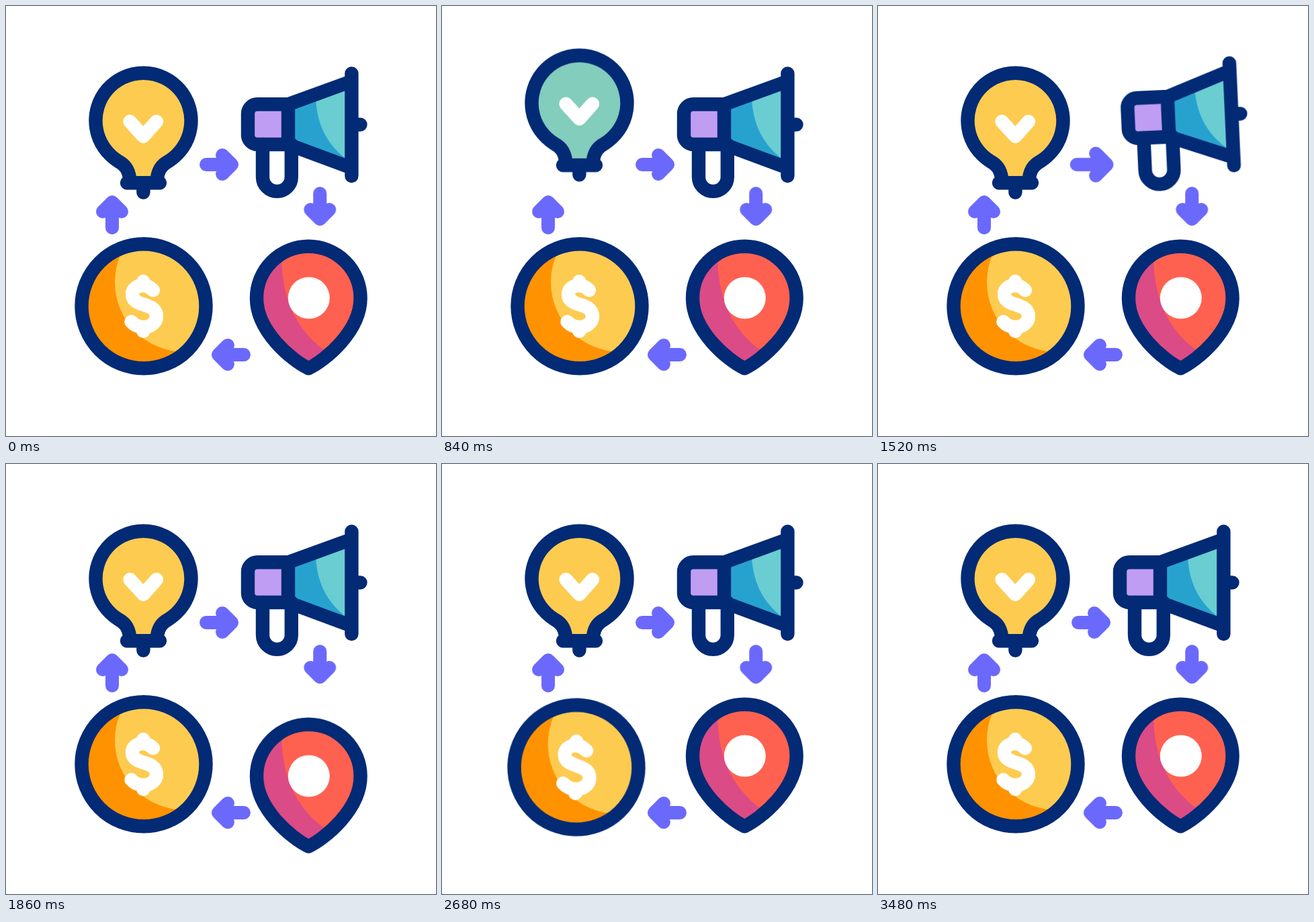
An HTML page that plays this animation: 640 px wide and 640 px high, repeating every 3.6 s.

```html
<!DOCTYPE html>
<html lang="en">
<head>
<meta charset="utf-8">
<title>Marketing cycle</title>
<style>
  html, body { margin: 0; width: 100%; height: 100%; overflow: hidden; background: #fff; }
  svg { display: block; width: 640px; height: 640px; }

  .line, .white, .arrow { stroke-width: 20.4; stroke-linecap: round; stroke-linejoin: round; fill: none; }
  .line { stroke: #032a75; }
  .white { stroke: #fff; }
  .arrow { stroke: #6b69fc; stroke-width: 20; }
  .arrow, .white { vector-effect: non-scaling-stroke; }

  .balloon, .skin, .horn, .pin, .coin, .dollar, .arrow {
    animation: 3600ms cubic-bezier(.33, 0, .67, 1) infinite;
  }
  .balloon { animation-name: rise; }
  .skin { animation-name: tint; fill: #fdcb50; }
  .horn { animation-name: shout; transform-origin: 443px 188px; }
  .pin { animation-name: drop; }
  .coin { animation-name: roll; transform-origin: 205px 446.8px; }
  .dollar { animation-name: grow; transform-origin: 204.5px 447px; }
  .arrow { animation-name: thrust; animation-delay: calc(var(--i) * 860ms - 3600ms); }

  @keyframes rise {
    0%, 2.22%, 30.8%, 100% { transform: translateY(0); }
    18.2% { transform: translateY(-41.5px); }
  }
  @keyframes tint {
    0%, 2.22%, 30%, 100% { fill: #fdcb50; }
    11%, 21% { fill: #69cdd2; }
  }
  @keyframes shout {
    0%, 23.9%, 46.4%, 100% { transform: translate(0, 0) rotate(0deg); }
    36.6% { transform: translate(32.5px, -32px) rotate(-6.7deg); }
  }
  @keyframes drop {
    0%, 45.55%, 70.3%, 100% { transform: translateY(0); }
    52.5%, 61.1% { transform: translateY(31px); }
  }
  @keyframes roll {
    0%, 72.2%, 96.4%, 100% { transform: translate(0, 0) rotate(0deg); }
    80.55%, 85.55% { transform: translate(-27.4px, 25px) rotate(6deg); }
  }
  @keyframes grow {
    0%, 72.2%, 96.4%, 100% { transform: scale(1); }
    80.55%, 85.55% { transform: scale(1.25); }
  }
  @keyframes thrust {
    0%, 4.44%, 20%, 100% { transform: translateY(0) scale(1); }
    6.67% { transform: translateY(-12px) scale(1.3); }
    8.33% { transform: translateY(-4px) scale(1.42); }
    11.1% { transform: translateY(4px) scale(1.37); }
    15% { transform: translateY(-15px) scale(1.31); }
    16.67% { transform: translateY(-2.5px) scale(1.37); }
  }
</style>
</head>
<body>
<svg viewBox="0 0 640 640" xmlns="http://www.w3.org/2000/svg">
  <defs>
    <path id="drop" d="M450.3 539.3C425 527 373 484 373 435A77.3 77.3 0 0 1 527.6 435C527.6 484 475.6 527 450.3 539.3Z"/>
    <clipPath id="inDrop"><use href="#drop"/></clipPath>
    <clipPath id="inCoin"><circle cx="205" cy="446.8" r="92"/></clipPath>
  </defs>

  <g transform="translate(158 311)"><path class="arrow" style="--i:0" d="M0 19V-19M-14-5L0-19L14-5"/></g>
  <g transform="translate(317 236) rotate(90)"><path class="arrow" style="--i:1" d="M0 19V-19M-14-5L0-19L14-5"/></g>
  <g transform="translate(467.3 298) rotate(180)"><path class="arrow" style="--i:2" d="M0 19V-19M-14-5L0-19L14-5"/></g>
  <g transform="translate(335 519) rotate(270)"><path class="arrow" style="--i:3" d="M0 19V-19M-14-5L0-19L14-5"/></g>

  <g class="balloon">
    <path class="skin" d="M184 260V254C182 242 176 236 167 231A71 71 0 1 1 242 231C233 236 227 242 225 254V260Z"/>
    <path class="line" d="M184 256C182 242 176 236 167 231A71 71 0 1 1 242 231C233 236 227 242 225 256M180 263.3H229M204.4 263.3V277.5"/>
    <path class="white" d="M184.5 172L204.4 194L224 172"/>
  </g>

  <g class="horn">
    <path fill="#bf9df3" d="M360 146H420V206H360Z"/>
    <path fill="#27a2cf" d="M420 146L514 112V241L420 206Z"/>
    <path fill="#69cdd2" d="M461 128C460 174 478 210 514 233V110Z"/>
    <path class="line" d="M382 206V254.5A21.4 21.4 0 0 0 424.8 254.5V206"/>
    <path class="line" d="M420 146.3H374A14 14 0 0 0 360 160.3V192A14 14 0 0 0 374 206H420ZM420 146.3L514.4 112M420 206L514.4 241M514.4 100.5V253M514.4 176.5H527.5"/>
  </g>

  <g class="pin">
    <use href="#drop" fill="#ff6150"/>
    <path clip-path="url(#inDrop)" fill="#db4b85" d="M411 350C405 430 430 488 490 523L450 560H350V350Z"/>
    <circle cx="450.8" cy="434.5" r="31" fill="#fff"/>
    <use href="#drop" class="line"/>
  </g>

  <g class="coin">
    <circle cx="205" cy="446.8" r="92" fill="#ff9200"/>
    <circle cx="266" cy="411" r="104" fill="#fdcb50" clip-path="url(#inCoin)"/>
    <circle class="line" cx="205" cy="446.8" r="92.5"/>
    <path class="white dollar" d="M219 423C214 418 209 416 204 416C195 416 188 421 188 429C188 449 224 440 224 462C224 471 215 478 205 478C197 478 191 475 186.500 470M204.300 410V416M204.300 478V484"/>
  </g>
</svg>
</body>
</html>
```
